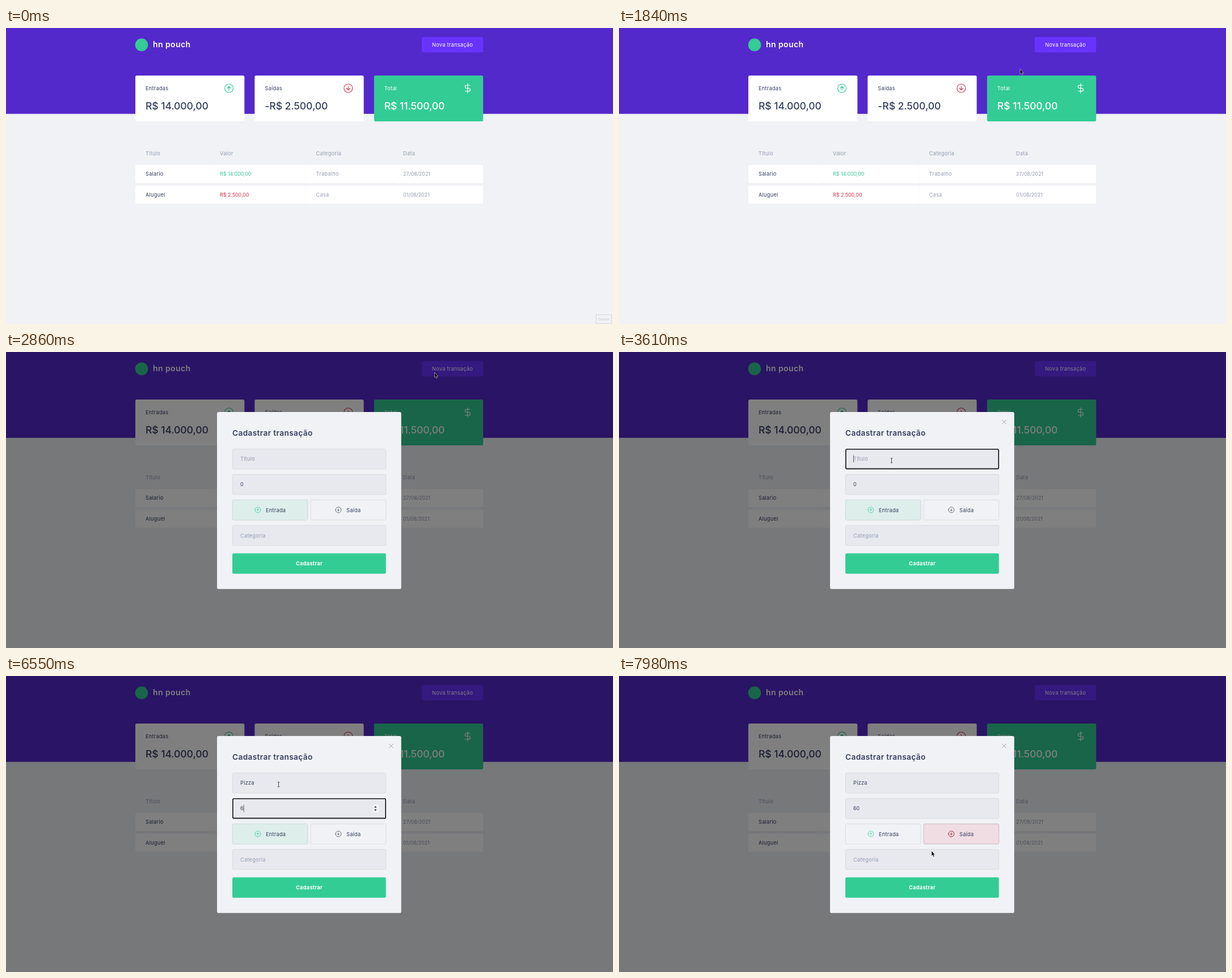
Write an HTML page that moves like this. It is 1070x523 px and loops after 8000 ms.

```html
<!DOCTYPE html>
<html lang="pt-BR">
<head>
<meta charset="utf-8">
<title>Transações</title>
<style>
html, body { margin: 0; width: 100%; height: 100%; overflow: hidden; background: #f0f2f5; }
svg { display: block; width: 1070px; height: 523px; }
text { font: 400 9.2px Inter, "Open Sans", sans-serif; letter-spacing: .03em; fill: #363f5f; white-space: pre; }
.soft { fill: #969cb2; }
.num { font-size: 8.9px; letter-spacing: 0; }
.sum { font-size: 17.6px; font-weight: 500; letter-spacing: -.005em; }
.brand { font-size: 14px; font-weight: 600; }
.head { font-size: 13.6px; font-weight: 600; }
.btn { font-weight: 700; text-anchor: middle; }
.white { fill: #fff; }
.green { fill: #33cc95; }
.red { fill: #e52e4d; }
.tip { font: 6.4px "Liberation Sans", Arial, sans-serif; letter-spacing: 0; fill: #a5a6aa; }
.icon { fill: none; stroke-linecap: round; stroke-linejoin: round; }
</style>
</head>
<body>
<svg id="stage" viewBox="0 0 1070 523" xmlns="http://www.w3.org/2000/svg"></svg>
<script>
const stage = document.getElementById('stage');

// Markup helpers
const rect = (x, y, w, h, fill, r = 0, more = '') =>
  `<rect x="${x}" y="${y}" width="${w}" height="${h}" rx="${r}" fill="${fill}" ${more}/>`;
const label = (x, y, str, cls = '', more = '') =>
  `<text x="${x}" y="${y}" class="${cls}" ${more}>${str}</text>`;
const icon = (x, y, scale, color, d, more = '') =>
  `<path class="icon" transform="translate(${x} ${y}) scale(${scale})" stroke="${color}" stroke-width="1.6" d="${d}" ${more}/>`;
const group = (id, body) => `<g id="${id}">${body}</g>`;

const RING = 'M-10 0a10 10 0 1 0 20 0a10 10 0 1 0-20 0';
const UP = RING + 'M4 0L0-4L-4 0M0 4V-4';
const DOWN = RING + 'M-4 0L0 4L4 0M0-4V4';
const DOLLAR = 'M0-11V11M5-7H-2.5a3.5 3.5 0 0 0 0 7h5a3.5 3.5 0 0 1 0 7H-6';
const CROSS = 'M-6-6L6 6M6-6L-6 6';

const card = (x, fill, title, sum, cls, color, d) =>
  rect(x, 84, 192.3, 81, fill, 2.8) + label(x + 18, 110.1, title, cls) +
  label(x + 18, 144.3, sum, 'sum ' + cls) + icon(x + 165, 106.5, .75, color, d);

const COLS = [228, 359, 528.5, 682, 841];
const row = (y, cells, tone) => cells.map((cell, i) =>
  rect(COLS[i], y, COLS[i + 1] - COLS[i], 32, '#fff', 2.2) +
  label(COLS[i] + 18, y + 19.3, cell, ['', 'num ' + tone, 'soft', 'num soft'][i])).join('');

const page =
  rect(0, 0, 1070, 523, '#f0f2f5') + rect(0, 0, 1070, 151.7, '#5429cc') +
  '<circle cx="239" cy="29.7" r="11.3" fill="#33cc95"/>' +
  label(259, 34.4, 'hn pouch', 'brand white') +
  rect(733, 16, 108, 27, '#6933ff', 2.5) +
  rect(733, 16, 108, 27, '#5f2ee9', 2.5, 'id="hover"') +
  label(751, 33.3, 'Nova transação', 'white') +
  card(228, '#fff', 'Entradas', 'R$ 14.000,00', '', '#33cc95', UP) +
  card(438.3, '#fff', 'Saídas', '-R$ 2.500,00', '', '#d63a55', DOWN) +
  card(648.8, '#33cc95', 'Total', 'R$ 11.500,00', 'white', '#fff', DOLLAR) +
  ['Título', 'Valor', 'Categoria', 'Data'].map((s, i) => label(COLS[i] + 18, 224.5, s, 'soft')).join('') +
  row(242, ['Salario', 'R$ 14.000,00', 'Trabalho', '27/08/2021'], 'green') +
  row(278.5, ['Aluguel', 'R$ 2.500,00', 'Casa', '01/08/2021'], 'red');

const field = y => rect(399.3, y + .3, 270.4, 35.6, '#e7e9ee', 2.5, 'stroke="#d7d7da" stroke-width=".8"');
const toggle = (x, fill, line, more = '') =>
  rect(x + .3, 261.3, 132.6, 35.6, fill, 2.5, `stroke="${line}" stroke-width=".8" ${more}`);

const modal =
  rect(0, 0, 1070, 523, '#000', 0, 'opacity=".5"') +
  rect(372, 106, 324.7, 312.7, '#f0f2f5', 2.8) +
  icon(679, 123.5, .58, '#969cb2', CROSS, 'id="close"') +
  label(399, 147.8, 'Cadastrar transação', 'head') +
  field(171) + field(216) + field(306) +
  label(413, 192.3, 'Título', 'soft', 'id="hint"') + label(413, 192.3, '', '', 'id="name"') +
  rect(413, 227, 6.2, 14, '#3390ff', 0, 'id="pick"') +
  label(413, 237.3, '0', 'num', 'id="value"') +
  group('spin', rect(646, 227, 10.5, 14, '#f1f2f4') +
    '<path fill="#222" d="M649 232.4l2.2-2.6l2.2 2.6zM649 235.8l2.2 2.6l2.2-2.6z"/>') +
  toggle(399, '#f0f2f5', '#d7d7da') + toggle(536.8, '#f0f2f5', '#d7d7da') +
  toggle(399, '#ddeeeb', '#cfdad9', 'id="in"') + toggle(536.8, '#efdde3', '#c9b6bd', 'id="out"') +
  icon(443.8, 279, .5, '#33cc95', UP) +
  icon(585.8, 279, .5, '#4b4f5c', DOWN) + icon(585.8, 279, .5, '#e0445c', DOWN, 'id="outIcon"') +
  label(458, 282.5, 'Entrada') + label(600, 282.5, 'Saída') +
  label(413, 327.5, 'Categoria', 'soft') +
  rect(399, 355.7, 270.7, 36, '#33cc95', 2.5) + label(534.5, 377.1, 'Cadastrar', 'btn white') +
  rect(399.8, 0, 269.4, 34.6, 'none', 2, 'id="focus" stroke="#101014" stroke-width="1.6"') +
  rect(0, 0, .7, 12.5, '#222', 0, 'id="caret"');

const tip = group('tip', rect(.5, .5, 27, 15.5, '#f4f5f7', 0, 'stroke="#c3c4c8"') +
  label(4, 11, 'Gravar', 'tip', 'id="tipText"'));

const pointers =
  '<circle id="click" r="6.6" fill="#d8b43c" opacity=".62"/>' +
  group('arrow', '<path d="M0 0V9L2 7.3L3.4 10.5L4.8 9.9L3.5 6.8H6Z" fill="#000" stroke="#fff" stroke-width=".5"/>') +
  group('hand', '<path d="M-.8.6Q0-.6.8.6V4.2L2 4.4L3.2 4.7L4.3 5.1Q5 5.4 4.9 6.4L4.2 9.2V10.6H-.6V9.6L-3 6.5Q-3.3 5.3-2.2 5.5L-.8 6.6Z" fill="#fff" stroke="#111" stroke-width=".55"/>') +
  group('beam', '<path d="M-1.8-4H1.8M0-4V4M-1.8 4H1.8" fill="none" stroke="#222" stroke-width=".8"/>');

stage.innerHTML = page + group('modal', modal) + tip + pointers;
const el = {};
stage.querySelectorAll('[id]').forEach(n => el[n.id] = n);

const LOOP = 8000, TICK = 68.2;
// Pointer stops: tick, x, y, eased arrival
const STOPS = [
  [8, 1061, 518], [9, 1047, 516], [10, 1047, 516], [11, 1005, 500], [14, 802, 391.5],
  [16, 562, 211], [18, 562, 211], [30, 734, 47, 1], [34, 755, 36], [42, 755.5, 36],
  [50, 480.5, 191.7, 1], [104, 480.5, 191.7], [111, 600, 281, 1], [114, 600, 281], [117, 551, 309]
];
const TYPED = [[4140, 'P'], [4410, 'Pi'], [4610, 'Piz'], [4710, 'Pizz'], [4810, 'Pizza']];
const CLICKS = [[2790, 2860, 755, 36.5], [3550, 3610, 480.5, 191.5], [7700, 7770, 600, 281]];

const clamp = v => Math.max(0, Math.min(1, v));
const show = (id, on) => el[id].setAttribute('visibility', on ? 'inherit' : 'hidden');
const fade = (id, v) => el[id].setAttribute('opacity', v);
const move = (id, x, y) => el[id].setAttribute('transform', `translate(${x} ${y})`);
const write = (id, s) => { if (el[id].textContent !== s) el[id].textContent = s; };
const width = id => el[id].textContent ? el[id].getComputedTextLength() : 0;

function pointerAt(tick) {
  let i = STOPS.findIndex(s => s[0] > tick);
  if (i < 0) return STOPS[STOPS.length - 1].slice(1, 3);
  if (i === 0) return null;
  const a = STOPS[i - 1], b = STOPS[i];
  let k = (tick - a[0]) / (b[0] - a[0]);
  if (b[3]) k = k * k * (3 - 2 * k);
  return [a[1] + (b[1] - a[1]) * k, a[2] + (b[2] - a[2]) * k];
}

function shapeAt(tick, x, y) {
  if (tick < 42) return x > 740 && y < 43 && tick > 30 ? 'hand' : 'arrow';
  if (tick >= 115 || x < 399 || x > 670) return 'arrow';
  if ((y > 171 && y < 207) || (y > 216 && y < 252)) return 'beam';
  return y > 261 && y < 297 ? 'hand' : 'arrow';
}

function drawPointer(t) {
  const tick = Math.floor((t + 15) / TICK);
  const p = pointerAt(tick), shape = p && shapeAt(tick, ...p);
  for (const id of ['arrow', 'hand', 'beam']) show(id, id === shape);
  if (p) move(shape, ...p);
  const c = CLICKS.find(([a, b]) => t >= a && t < b);
  show('click', c);
  if (c) move('click', c[2], c[3]);

  const drop = clamp((tick - 11) / 3);
  show('tip', tick < 16);
  move('tip', 1040 - drop, tick < 15 ? 506 + 9 * drop : 519);
  fade('tip', tick < 11 ? .6 : 1);
  write('tipText', t < 70 ? 'Gravar' : 'Pausar');
}

function drawForm(t) {
  show('modal', t >= 2860);
  show('close', t >= 2930);
  const name = TYPED.reduce((s, [at, str]) => t >= at ? str : s, '');
  write('name', name);
  show('hint', !name);

  const inName = t >= 3550 && t < 5080, inValue = t >= 5080 && t < 7700;
  const picked = inValue && t < 6550;
  write('value', t < 6550 ? '0' : t < 6620 ? '6' : '60');
  el.value.style.fill = picked ? '#fff' : '';
  show('pick', picked);
  show('spin', inValue);
  show('focus', inName || inValue);
  el.focus.setAttribute('y', inName ? 171.8 : 216.8);

  const blink = (t >= 4070 && t < 4140) || t >= 7150;
  show('caret', (inName || inValue) && !picked && !blink);
  move('caret', 413.2 + width(inName ? 'name' : 'value'), inName ? 182.6 : 227.7);

  const k = clamp((t - 7700) / 210);
  fade('in', 1 - k);
  fade('out', k);
  fade('outIcon', k);
}

const start = performance.now();
function frame() {
  const t = (performance.now() - start) % LOOP;
  fade('hover', t < 2860 ? clamp((t - 2120) / 200) : 0);
  drawForm(t);
  drawPointer(t);
  requestAnimationFrame(frame);
}
frame();
</script>
</body>
</html>
```
